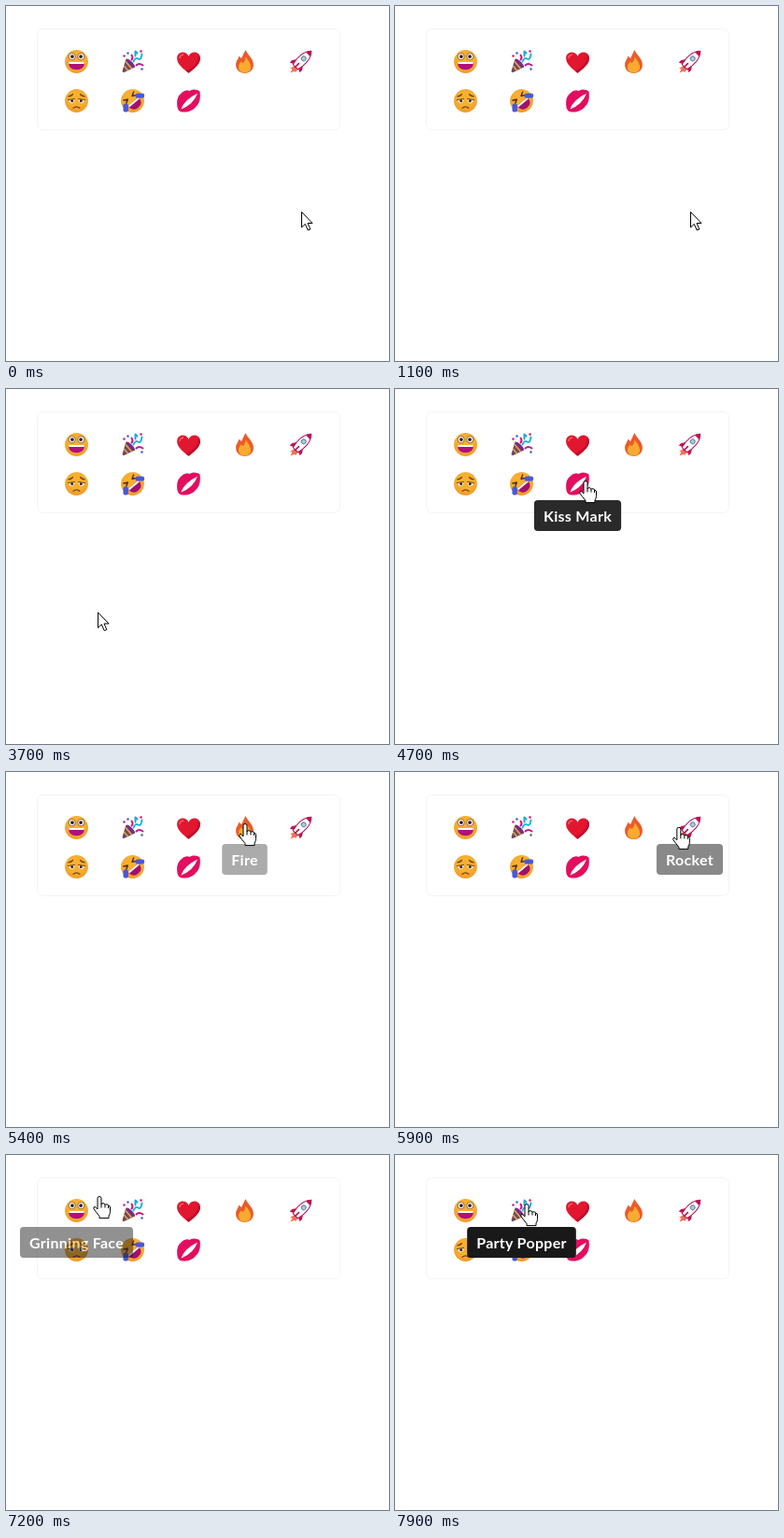
An HTML page that plays this animation: 410x380 px, repeating every 8 s.

```html
<!DOCTYPE html>
<html lang="en">
<head>
<meta charset="utf-8">
<title>Emoji tooltips</title>
<style>
  html, body { margin: 0; width: 100%; height: 100%; overflow: hidden; background: #fff; }
  svg { display: block; }
  text { font: 700 16px Lato, sans-serif; letter-spacing: .3px; text-anchor: middle; fill: #fff; }
  .line { fill: none; stroke-linecap: round; stroke-linejoin: round; }
  .pointer { fill: #fff; stroke: #000; stroke-linejoin: round; }
</style>
</head>
<body>
<svg width="410" height="380" viewBox="0 0 410 380">
  <defs>
    <radialGradient id="skin" cx=".5" cy=".4" r=".65">
      <stop offset=".5" stop-color="#f9b02e"/><stop offset="1" stop-color="#f0962a"/>
    </radialGradient>
  </defs>
  <rect x="33.5" y="24.5" width="324" height="108" rx="6" fill="#fff" stroke="#f4f4f4"/>

  <g class="emoji">
    <circle r="12.4" fill="url(#skin)"/>
    <g fill="#fff" stroke="#7a4a1c" stroke-width=".8"><circle cx="-4.8" cy="-5.4" r="3.6"/><circle cx="4.8" cy="-5.4" r="3.6"/></g>
    <g fill="#2b2030"><circle cx="-4.6" cy="-5.4" r="1.9"/><circle cx="4.6" cy="-5.4" r="1.9"/></g>
    <path d="M-8.6.4H8.6Q8.4 8.8 0 8.8T-8.6.4Z" fill="#b0107a"/>
    <path d="M-8.4.4H8.4L8 2.4H-8Z" fill="#fff"/>
  </g>

  <g class="emoji">
    <path d="M-7-3L2.5 6L-9 11.4Q-11.4 12-10.8 9.4Z" fill="#6d4a63"/>
    <path d="M-7 .5L-1.5 7M-8.8 5L-5.2 9.2" class="line" stroke="#e6a544" stroke-width="1.6"/>
    <ellipse cx="-2" cy="1.5" rx="1.8" ry="6.2" transform="rotate(-45 -2 1.5)" fill="#7b2a86"/>
    <g class="line" stroke-width="2">
      <path d="M-1-2Q1-4-1-7" stroke="#d8127a"/>
      <path d="M1 0Q3-5 6-3T10-8" stroke="#17b5dd"/>
      <path d="M4 4Q7 1 11 4" stroke="#c3168c"/>
      <path d="M3-6V-11L5-9" stroke="#19a9d9"/>
    </g>
    <g fill="#355bd0"><circle cx="-5" cy="-9" r="1.2"/><circle cx="10" cy="8" r="1.2"/></g>
    <g fill="#dc1278"><circle cx="9" cy="-11" r="1.3"/><circle cx="-9" cy="-6" r="1.2"/></g>
  </g>

  <g class="emoji">
    <path d="M0 12.2C-5 8-12.4 3-12.4-3.6C-12.4-11-3-12.4 0-5.8C3-12.4 12.4-11 12.4-3.6C12.4 3 5 8 0 12.2Z" fill="#e2162e"/>
    <path d="M0 12.2C5 8 12.4 3 12.4-3.6Q12.2-7 10-8.6C11.4 1 5 6-3 9.8Z" fill="#bd102e"/>
    <path d="M-9.6-4Q-9-7-6-7.4" class="line" stroke="#f25a62" stroke-width="1.6"/>
  </g>

  <g class="emoji">
    <path d="M1-12.5C3-7 9-4 9.4 3C9.6 9 5 12.5 0 12.5S-9.6 9-9.4 3C-9.2-1-7-2-6-6Q-4.5-4-3.4-3.6C-2-6-1-9 1-12.5Z" fill="#ec5a29"/>
    <path d="M1-5C4-1 6.6 2 6.6 6C6.6 10 3 12 0 12S-6.6 10-6.6 6C-6.6 3-5 2-4 0Q-2.6 1.4-1.8 1.6C0 0 .6-2 1-5Z" fill="#f8ab2e"/>
  </g>

  <g class="emoji">
    <path d="M-6 4L-11.5 7.5L-9 8L-11 12L-6.5 10.2L-5.5 11.5L-2 7Z" fill="#ef7254"/>
    <g transform="rotate(45)">
      <path d="M-4 0L-7.6 5.5V9L-3 7ZM4 0L7.6 5.5V9L3 7Z" fill="#c01354"/>
      <path d="M0-16C6-10 6 0 3.6 8H-3.6C-6 0-6-10 0-16Z" fill="#fff" stroke="#b81150"/>
      <path d="M0-16Q2.6-13.6 3.4-11H-3.4Q-2.6-13.6 0-16Z" fill="#c01354"/>
      <circle cy="-4.5" r="2.4" fill="#9fd0ea" stroke="#6d7c9a"/>
      <path d="M0 3V8.5" class="line" stroke="#b81150" stroke-width="1.6"/>
    </g>
  </g>

  <g class="emoji">
    <circle r="12.4" fill="url(#skin)"/>
    <path d="M-8.6-1.4H-2Q-2.4 2.2-5.2 2.2T-8.6-1.4ZM8.6-1.4H2Q2.4 2.2 5.2 2.2T8.6-1.4Z" fill="#fff"/>
    <g fill="#33222a"><circle cx="-4.8" cy="0" r="1.5"/><circle cx="4.8" cy="0" r="1.5"/></g>
    <g class="line" stroke="#6b4020" stroke-width="1.2">
      <path d="M-9-1L-2-2M9-1L2-2M-8.6-4.6Q-5.5-5.2-4-7M8.6-4.6Q5.5-5.2 4-7"/>
      <path d="M-3.4 7.8Q0 4.8 3.4 7.8"/>
    </g>
  </g>

  <g class="emoji">
    <circle r="12.4" fill="url(#skin)"/>
    <g transform="rotate(-40)">
      <path d="M-7.4 1H7.4Q7.4 9.6 0 9.6T-7.4 1Z" fill="#a3106c"/>
      <path d="M-7.2 1H7.2L6.8 3H-6.8Z" fill="#fff"/>
      <path d="M-7-6.6L-3-4.4L-7-2.2M7-6.6L3-4.4L7-2.2" class="line" stroke="#4a2a26" stroke-width="1.4"/>
    </g>
    <g fill="#4758dc"><rect x="3" y="-8" width="9.6" height="5" rx="2"/><rect x="-10" y="3" width="5.4" height="9" rx="2"/></g>
  </g>

  <g class="emoji">
    <path d="M-12 7C-13 0-12-5-8-8C-5-11-1-12 1-10.5C5-13 10-12 12-10C13-4 12 3 8 6C5 10 0 12-5 12C-9 12-11 11-12 7Z" fill="#e40d60"/>
    <path d="M-8 9Q-5-1 9.5-8Q5 4-8 9Z" fill="#fff"/>
  </g>

  <g id="tip"><rect height="33" rx="4" fill="#191919"/><text y="23"></text></g>

  <path id="arrow" class="pointer" d="M.5.5V17L4.3 13.4L7.2 20L9.8 19L7 12.5H12Z"/>
  <g id="hand" class="pointer">
    <path d="M-2 13V2.2Q-2 .5 0 .5T2 2.2V9Q2 7.5 4 7.7T6 9.5Q6 8.5 8 8.8T9.5 10.5Q11.5 10 11.5 12V16.5Q11.5 19 10 21V23.6H0V21.5Q-3 18-6 13.8Q-6.6 11.5-5 11.4Q-3.5 12-2 14Z"/>
    <path d="M2 9V12.5M6 9.5V12.5M9.5 10.5V13" fill="none"/>
  </g>
</svg>
<script>
const LOOP = 8000, STEP = 100, FADE = 400;
const COLS = 5, CELL_W = 60, CELL_H = 42, LEFT = 46, TOP = 38.5;
const NAMES = ['Grinning Face', 'Party Popper', 'Red Heart', 'Fire', 'Rocket',
  'Weary Face', 'Rolling Laugh', 'Kiss Mark'];

// Eased pointer moves: from, to (ms), x, y
const START = [316, 220];
const MOVES = [
  [1400, 1600, 312, 251], [2000, 2100, 94, 244],
  [3570, 4700, 204, 98], [4750, 5050, 204, 57], [5250, 5400, 256, 55],
  [5550, 5950, 306, 59], [6100, 7200, 100, 44], [7300, 7900, 141, 52]
];

const $ = s => document.querySelector(s);
const tip = $('#tip'), box = $('#tip rect'), label = $('#tip text');
const arrow = $('#arrow'), hand = $('#hand');

const clamp = k => Math.max(0, Math.min(1, k));
const smooth = k => k * k * (3 - 2 * k);
const easeOut = k => k * (2 - k);
const show = (el, on) => el.style.display = on ? '' : 'none';
const place = (el, x, y) => el.setAttribute('transform', `translate(${x} ${y})`);
const centre = i => [LEFT + 29.5 + CELL_W * (i % COLS), TOP + 21 + CELL_H * Math.floor(i / COLS)];

document.querySelectorAll('.emoji').forEach((el, i) => place(el, ...centre(i)));

function pointer(t) {
  let [x, y] = START;
  for (const [from, to, endX, endY] of MOVES) {
    const k = smooth(clamp((t - from) / (to - from)));
    x += (endX - x) * k;
    y += (endY - y) * k;
  }
  return [x, y];
}

// Index of the emoji under the pointer, or -1
function cellAt(t) {
  const [x, y] = pointer(t);
  const col = Math.floor((x - LEFT) / CELL_W), row = Math.floor((y - TOP) / CELL_H);
  const inside = col >= 0 && col < COLS && row >= 0 && row * COLS + col < NAMES.length;
  return inside ? row * COLS + col : -1;
}

function drawTip(t, cell) {
  let entered = t;
  while (entered > 0 && cellAt(entered - 10) === cell) entered -= 10;
  const [x, y] = centre(cell);
  label.textContent = NAMES[cell];
  const width = label.getComputedTextLength() + 20;
  box.setAttribute('x', -width / 2);
  box.setAttribute('width', width);
  tip.setAttribute('opacity', easeOut(clamp((t - entered) / FADE)));
  place(tip, x, y + 17.5);
}

function draw(now) {
  const t = Math.floor(now % LOOP / STEP) * STEP;
  const cell = cellAt(t), hovering = cell >= 0;
  const [x, y] = pointer(t);
  place(arrow, x, y);
  place(hand, x, y);
  show(arrow, !hovering);
  show(hand, hovering);
  show(tip, hovering);
  if (hovering) drawTip(t, cell);
  requestAnimationFrame(draw);
}
requestAnimationFrame(draw);
</script>
</body>
</html>
```
